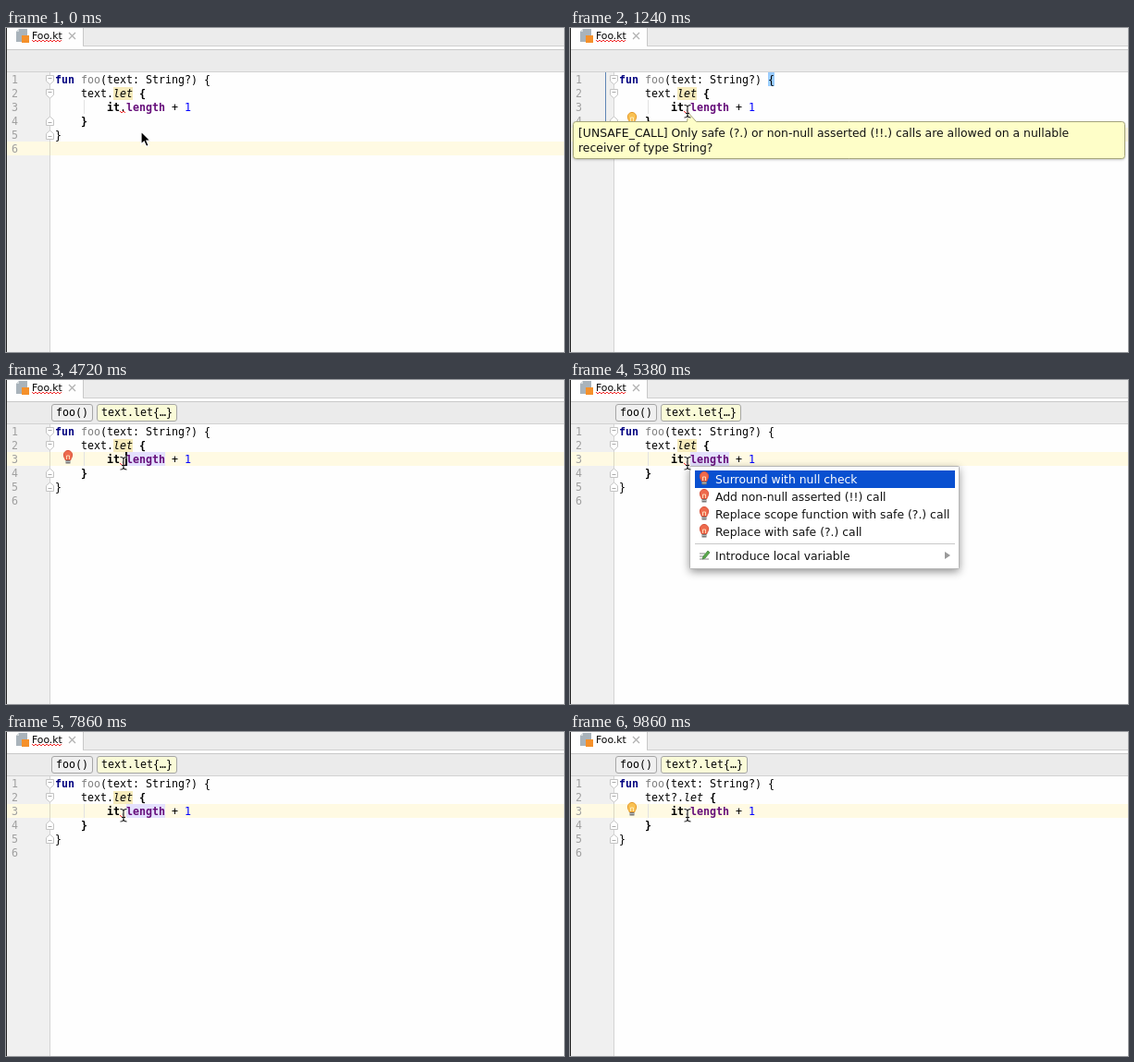
Animation, 603 px wide and 351 px high, one loop 9920 ms. Source, as an HTML page with a canvas:

```html
<!DOCTYPE html>
<html>
<head>
<meta charset="utf-8">
<style>
html, body { margin: 0; width: 100%; height: 100%; overflow: hidden; background: #fff; }
canvas { display: block; }
</style>
</head>
<body>
<canvas id="stage" width="603" height="351"></canvas>
<script>
const ctx = document.getElementById('stage').getContext('2d');
const LOOP = 9920, CHAR = 7, LINE = 15, LEFT = 53;
const MONO = '11.63px "DejaVu Sans Mono", monospace';
const UI = '12.4px "DejaVu Sans", sans-serif';
const NAVY = '#000080', PURPLE = '#660e7a', YELLOW = '#fffae3';

const clamp = v => Math.max(0, Math.min(1, v));
const lineTop = n => 48 + LINE * (n - 1);

function rect(x, y, w, h, color) {
  ctx.fillStyle = color;
  ctx.fillRect(x, y, w, h);
}

function text(str, x, y, color = '#000', font = MONO) {
  ctx.font = font;
  ctx.fillStyle = color;
  ctx.fillText(str, x, y);
}

// Writes code at a line and column; style is '', 'bold' or 'italic'.
function code(str, line, col, color, style = '') {
  text(str, LEFT + col * CHAR, lineTop(line) + 12, color, style + ' ' + MONO);
}

function shape(d, fill, stroke, width = 1) {
  const path = new Path2D(d);
  if (fill) { ctx.fillStyle = fill; ctx.fill(path); }
  if (stroke) { ctx.strokeStyle = stroke; ctx.lineWidth = width; ctx.stroke(path); }
}

function box(x, y, w, h, r, fill, stroke) {
  ctx.beginPath();
  ctx.roundRect(x + .5, y + .5, w, h, r);
  ctx.fillStyle = fill;
  ctx.fill();
  ctx.shadowColor = 'transparent';
  ctx.strokeStyle = stroke;
  ctx.lineWidth = 1;
  ctx.stroke();
}

function squiggle(x1, x2, y) {
  ctx.beginPath();
  for (let x = x1, i = 0; x <= x2; x += 2, i++) ctx.lineTo(x, y + (i % 2 ? 2 : 0));
  ctx.strokeStyle = '#f03030';
  ctx.lineWidth = 1;
  ctx.stroke();
}

function bulb(x, y, fill, edge) {
  ctx.save();
  ctx.translate(x, y);
  shape('M-3 3.5 C-3 2 -4.6 1 -4.6 -2 A4.6 4.6 0 0 1 4.6 -2 C4.6 1 3 2 3 3.5Z', fill, edge);
  shape('M-1.5 3 L-1.5 -1 L1.5 -1 L1.5 3', null, '#fff4d0', .8);
  rect(-2.5, 4, 5, 3.5, '#777');
  rect(-2.5, 5.2, 5, .8, '#ccc');
  ctx.restore();
}
const yellowBulb = (x, y) => bulb(x, y, '#f9c152', '#e59a2c');
const redBulb = (x, y) => bulb(x, y, '#ee6a4d', '#d9553c');

function foldMark(line, up) {
  ctx.save();
  ctx.translate(47.5, lineTop(line) + 8);
  if (up) ctx.scale(1, -1);
  shape('M-4 -4.5 H4 V1.5 L0 5 L-4 1.5Z', '#fff', '#c4c4c4');
  shape('M-2 -1.5 H2', null, '#aaa');
  ctx.restore();
}

function chrome(t) {
  rect(0, 0, 603, 351, '#fefefe');
  rect(83, 0, 520, 19, '#ececec');
  rect(83, 0, 1, 19, '#c8c8c8');
  rect(83, 19, 520, 1, '#cfcfcf');
  rect(0, 23, 603, 1, '#c9c9c9');
  rect(0, 24, 603, 23, '#ebebeb');
  rect(0, 47, 603, 1, '#d2d2d2');
  rect(0, 48, 47, 303, '#f0f0f0');
  rect(47, 48, 1, 303, '#d4d4d4');

  shape('M14 1 H23 V15 H11 V4Z', '#a9b3bb');
  shape('M11 4 L14 1 V4Z', '#d5dadd');
  rect(17, 8, 8, 8, '#f5902a');
  text('Foo.kt', 28, 12, '#000', '10.8px "DejaVu Sans", sans-serif');
  if (t < 8190) squiggle(28, 61, 13);
  shape('M68 5 L75 12 M75 5 L68 12', null, '#b0b0b0', 1.2);

  if (t >= 4090) {
    const crumb = t < 8190 ? 'text.let{…}' : 'text?.let{…}';
    box(49, 26, 44, 18, 2.5, '#f0f0f0', '#a6a6a6');
    text('foo()', 54, 39);
    box(98, 26, crumb.length * CHAR + 9, 18, 2.5, '#fafbd8', '#a6a6a6');
    text(crumb, 103, 39);
  }
}

function editor(t) {
  const caretLine = t < 390 ? 6 : t < 3880 ? 5 : 3;
  const fixed = t >= 7920;
  const bracesLit = t >= 390 && t < 3880;
  rect(0, lineTop(caretLine), 603, LINE, YELLOW);
  rect(47, lineTop(caretLine), 1, LINE, '#dcd8c4');
  rect(0, 0, 1, 351, '#222');
  for (let n = 1; n <= 6; n++) text(n, 6, lineTop(n) + 12, '#a0a0a0');
  if (bracesLit) {
    rect(38, 48, 1, 75, '#5f86b5');
    rect(214, 48, 7, LINE, '#99ccff');
    rect(53, 108, 7, LINE, '#99ccff');
  }
  [1, 2].forEach(n => foldMark(n, false));
  [4, 5].forEach(n => foldMark(n, true));
  rect(84, 78, 1, LINE, '#e2e2e2');

  code('fun', 1, 0, NAVY, 'bold');
  code('foo', 1, 4, '#808080');
  code('(text: String?) {', 1, 7);
  const receiver = fixed ? 'text?.' : 'text.';
  const letCol = 4 + receiver.length;
  if (!fixed) rect(116, 64, 21, 14, '#f6ebbc');
  code(receiver, 2, 4);
  code('let', 2, letCol, '#000', 'italic');
  code('{', 2, letCol + 4, '#000', 'bold');
  if (t >= 4180 && !fixed) rect(130, 78, 42, LINE, '#e4e0fd');
  code('it', 3, 8, '#000', 'bold');
  code('.', 3, 10);
  code('length', 3, 11, PURPLE, 'bold');
  code('+', 3, 18);
  code('1', 3, 20, '#0000ff');
  code('}', 4, 4, '#000', 'bold');
  code('}', 5, 0);
  if (!fixed) squiggle(123, 130, 90);

  if (t >= 3880 && t < 4930) rect(129, 78, 2, LINE, '#000');
  if (t >= 8290 && t < 8850 || t >= 9360 && t < 9860) rect(108, 78, 2, LINE, '#000');
  if (t >= 1000 && t < 3880) yellowBulb(67, 98);
  if (t >= 4720 && t < 5350) redBulb(67, 83);
  if (t >= 8770) yellowBulb(67, 83);
}

function tooltip(alpha) {
  if (alpha <= 0) return;
  ctx.save();
  ctx.globalAlpha = alpha;
  ctx.shadowColor = 'rgba(0,0,0,.3)';
  ctx.shadowBlur = 3;
  ctx.shadowOffsetY = 1;
  box(3, 101, 596, 40, 3, '#fefec8', '#a5a57c');
  shape('M126.5 102 L128 92 L137 102', '#fefec8');
  shape('M126.5 101.5 L128 92 L136.5 101.5', null, '#a5a57c');
  text('[UNSAFE_CALL] Only safe (?.) or non-null asserted (!!.) calls are allowed on a nullable', 9, 118, '#111', UI);
  text('receiver of type String?', 9, 134, '#111', UI);
  ctx.restore();
}

const ACTIONS = [
  'Surround with null check',
  'Add non-null asserted (!!) call',
  'Replace scope function with safe (?.) call',
  'Replace with safe (?.) call'
];

function menu(t) {
  if (t < 5350 || t >= 7860) return;
  const selected = t < 6490 ? 0 : t < 6790 ? 1 : 2;
  ctx.save();
  ctx.globalAlpha = t < 5380 ? .5 : 1;
  ctx.shadowColor = 'rgba(0,0,0,.45)';
  ctx.shadowBlur = 10;
  ctx.shadowOffsetY = 3;
  box(129, 93, 291, 111, 1, '#fff', '#b5b5b5');
  ACTIONS.forEach((label, i) => {
    const y = 98 + 19 * i;
    if (i === selected) rect(135, y, 281, 19, '#0950d0');
    redBulb(145, y + 8);
    text(label, 157, y + 14, i === selected ? '#fff' : '#111', UI);
  });
  rect(135, 177, 281, 1, '#c8c8c8');
  shape('M140 188 H146 M140 191 H145 M140 194 H150', null, '#888');
  shape('M143 194 L144 191 L149 185 L151 187 L146 193Z', '#59a84b', '#3e7f38', .7);
  text('Introduce local variable', 157, 195, '#111', UI);
  shape('M405 186 L411 190 L405 194Z', '#999');
  ctx.restore();
}

function pointer(t) {
  const p = clamp((t - 390) / 400), e = p * p * (3 - 2 * p);
  ctx.save();
  ctx.translate(146 - 19 * e, 112 - 22 * e);
  if (t < 390) {
    shape('M0 0 V14 L3.2 11 L5.7 16.4 L8.2 15.3 L5.9 10.2 H10Z', '#000', '#fff', 1.2);
  } else {
    const beam = 'M-3.5 -6.5 Q0 -6.5 0 -4 Q0 -6.5 3.5 -6.5 M0 -4 V5 M-2 2.5 H2 M-3.5 7 Q0 7 0 4.5 Q0 7 3.5 7';
    shape(beam, null, 'rgba(255,255,255,.8)', 2.6);
    shape(beam, null, '#111', 1.1);
  }
  ctx.restore();
}

function draw(now) {
  const t = now % LOOP;
  chrome(t);
  editor(t);
  if (t < 3880) tooltip(clamp((t - 1000) / 240));
  menu(t);
  pointer(t);
  requestAnimationFrame(draw);
}
requestAnimationFrame(draw);
</script>
</body>
</html>
```
